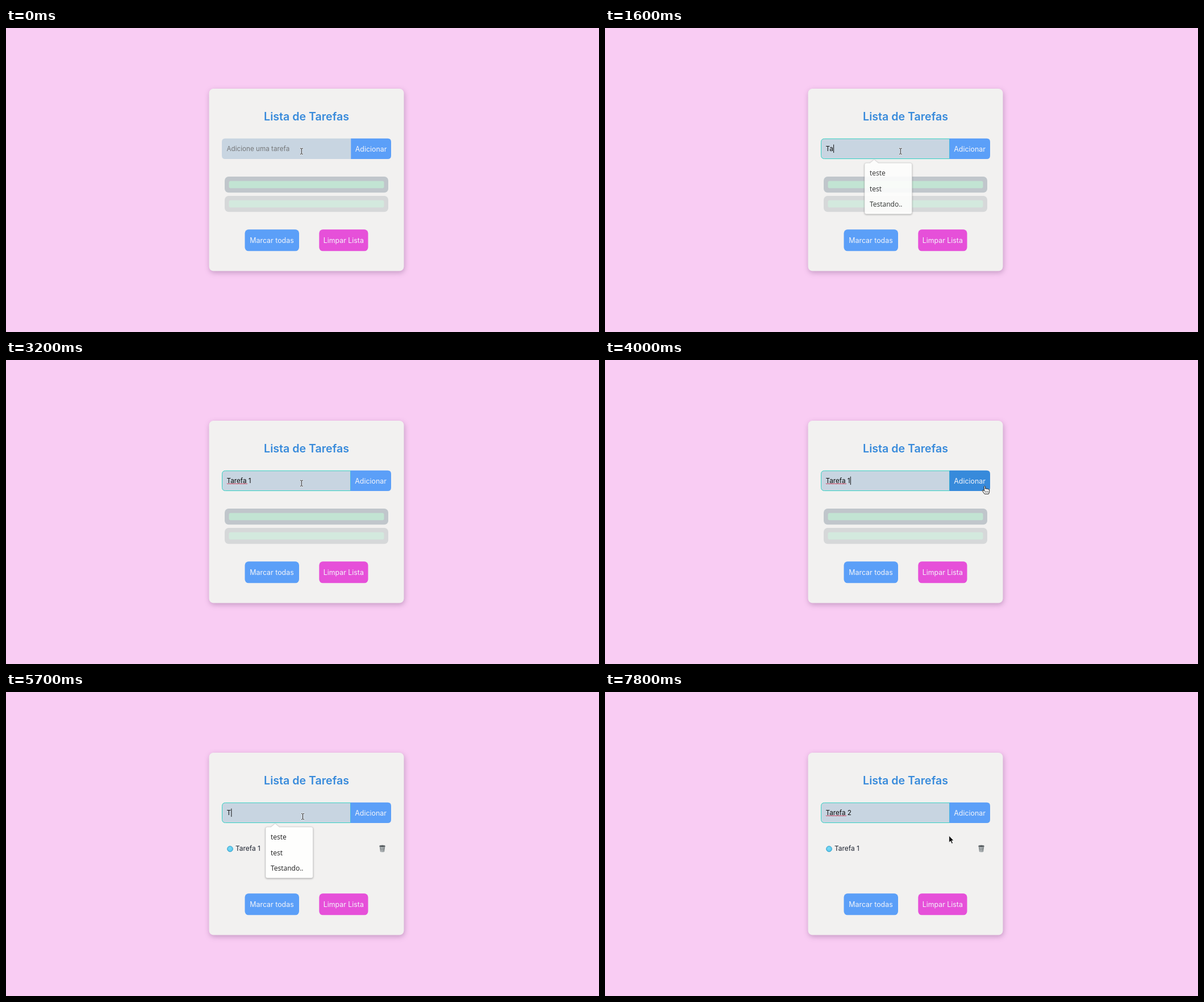
Animation of 1044 by 536 pixels, one loop 8 s. Source, as an HTML page:

```html
<!DOCTYPE html>
<html lang="pt-BR">
<head>
<meta charset="utf-8">
<title>Lista de Tarefas</title>
<style>
  html, body { margin: 0; width: 100%; height: 100%; overflow: hidden; background: #f9ccf3; }
  svg { display: block; width: 1044px; height: 536px; }
  text { font-family: Inter, "Open Sans", sans-serif; white-space: pre; }
  .card { fill: #f2f1f0; filter: drop-shadow(1px 3px 5px rgba(60, 20, 70, .27)); }
  .title { font-size: 19.6px; font-weight: 600; fill: #378adb; text-anchor: middle; }
  .label { font-size: 12.4px; fill: #f4f5fa; text-anchor: middle; }
  .entry { font-size: 11.7px; }
  .item { font-size: 11.9px; fill: #1d2330; }
  .popup text { font-family: "Open Sans", "Noto Sans", sans-serif; font-size: 12px; fill: #1c1c1c; }
  .popup path { fill: #fefefd; stroke: #c9c9c9; stroke-width: .6; filter: drop-shadow(0 1px 1.5px rgba(0, 0, 0, .3)); }
</style>
</head>
<body>
<svg viewBox="0 0 1044 536">
  <defs>
    <radialGradient id="bead" cx=".45" cy=".4" r=".6">
      <stop offset="0" stop-color="#7adcf8"/>
      <stop offset="1" stop-color="#53c4ea"/>
    </radialGradient>
    <linearGradient id="steel">
      <stop offset="0" stop-color="#858b8e"/>
      <stop offset=".45" stop-color="#c9ced0"/>
      <stop offset="1" stop-color="#7d8386"/>
    </linearGradient>
  </defs>

  <rect class="card" x="357.5" y="107" width="343" height="321.5" rx="8"/>
  <text class="title" x="529" y="163">Lista de Tarefas</text>

  <path id="field" fill="#c8d5e1"/>
  <path id="addButton"/>
  <text class="label" id="addLabel" y="217.5">Adicionar</text>
  <text class="entry" id="entry" x="388.5" y="216.8"></text>
  <path id="squiggle" fill="none" stroke="#d0213f" stroke-width=".9"/>
  <rect id="caret" y="205.5" width="1" height="14.5" fill="#111"/>

  <g id="skeleton">
    <rect x="385" y="262" width="288" height="28.2" rx="7" fill="#c0c6cb"/>
    <rect x="392.5" y="269.8" width="273" height="12.8" rx="3" fill="#c2e4d3"/>
    <rect x="385" y="296" width="288" height="28.2" rx="7" fill="#d6d8d9"/>
    <rect x="392.5" y="303.8" width="273" height="12.8" rx="3" fill="#d3e9de"/>
  </g>

  <g id="task">
    <circle cx="394.5" cy="276.7" r="4.9" fill="url(#bead)" stroke="#3d9fc8"/>
    <text class="item" x="404" y="280.3">Tarefa 1</text>
    <path d="M657.6 272h9.8l-1.2 9.4q-3.7 2.4-7.4 0z" fill="url(#steel)"/>
    <path d="M660 274l.8 7M662.5 274v8M665 274l-.8 7M659 277h7" stroke="#747a7d" stroke-width=".6"/>
    <ellipse cx="662.5" cy="271.8" rx="5.2" ry="1.7" fill="#4b5053" stroke="#a4aaad" stroke-width=".8"/>
  </g>

  <rect x="420.5" y="355.3" width="95.5" height="38" rx="6.5" fill="#5b9ff8"/>
  <text class="label" x="468" y="379">Marcar todas</text>
  <rect x="551.3" y="355.3" width="86.2" height="38" rx="6.5" fill="#e650d9"/>
  <text class="label" x="594.3" y="379">Limpar Lista</text>

  <g id="popup" class="popup">
    <path d="M460 238h6.5l7.3-6 7.3 6H537.5q3 0 3 3V325q0 3-3 3H460q-3 0-3-3V241q0-3 3-3z"/>
    <text x="466" y="259.8">teste</text>
    <text x="466" y="287.6">test</text>
    <text x="466" y="315.4">Testando..</text>
  </g>

  <g id="ibeam" fill="none" stroke-linecap="square">
    <path d="M-2-5H-.8L0-4.2.8-5H2M0-4V4M-2 5H-.8L0 4.2.8 5H2" stroke="#fff" stroke-width="2.2" opacity=".75"/>
    <path d="M-2-5H-.8L0-4.2.8-5H2M0-4V4M-2 5H-.8L0 4.2.8 5H2" stroke="#222" stroke-width="1"/>
  </g>
  <path id="arrow" d="M0 0V12.2L2.8 9.7 4.8 14.2 6.9 13.2 5 8.9H8.5z" fill="#111" stroke="#fff" stroke-width=".8"/>
  <g id="hand" stroke-linejoin="round" stroke-linecap="round">
    <path d="M-1.1.8Q0-.6 1.1.8V5Q2.4 3.9 3.4 5.2 4.8 4.3 5.8 5.7 7.5 5 8.2 6.8V9.5Q8 11.8 6.8 14H-.2L-3.8 9.2Q-5 7.4-3.3 7L-1.1 8.8z" fill="#fff" stroke="#1b1b1b"/>
    <path d="M1.1 8.8V11.5M3.4 8.8V11.5M5.6 8.8V11.5" stroke="#1b1b1b" stroke-width=".7"/>
  </g>
</svg>
<script>
const LOOP = 8000;
const PLACEHOLDER = 'Adicione uma tarefa';
const $ = id => document.getElementById(id);
const ui = Object.fromEntries(
  ['field', 'addButton', 'addLabel', 'entry', 'squiggle', 'caret', 'skeleton', 'task',
   'popup', 'ibeam', 'arrow', 'hand'].map(id => [id, $(id)]));

const at = (kind, x, y) => ({ pointer: [kind, x, y] });

// Each step lists only what changes at its time.
const steps = [
  [0, { text: '', focus: false, caret: false, added: false, misspelt: false, popup: 0, hover: 0,
        ...at('ibeam', 520.3, 217.3) }],
  [600, { focus: true, caret: true }],
  [1100, { caret: false }],
  [1300, { text: 'T', caret: true }],
  [1500, { popup: 1 }],
  [1600, { text: 'Ta', popup: .9 }],
  [1700, { popup: .2 }],
  [1900, { text: 'Taref', popup: 0 }],
  [2200, { text: 'Tarefa' }],
  [2400, { text: 'Tarefa ' }],
  [2600, { text: 'Tarefa 1', misspelt: true }],
  [3200, { caret: false }],
  [3400, at('arrow', 468, 138)],
  [3600, { caret: true, ...at('arrow', 510, 160) }],
  [3700, at('arrow', 575, 180)],
  [3800, { hover: .4, ...at('hand', 640, 207) }],
  [3900, { hover: .9, ...at('hand', 662, 219) }],
  [4000, { hover: 1, ...at('hand', 668.5, 222.2) }],
  [4200, { text: '', focus: false, caret: false, misspelt: false, added: true }],
  [4300, at('hand', 650, 219)],
  [4400, { hover: .8, ...at('ibeam', 570, 218) }],
  [4500, { hover: .4, ...at('ibeam', 522.5, 219.5) }],
  [4800, { hover: 0 }],
  [5000, { focus: true, caret: true }],
  [5400, { text: 'T' }],
  [5700, { popup: 1 }],
  [5800, { text: 'Ta', popup: .9 }],
  [5900, { popup: .2 }],
  [6100, { text: 'Taref', popup: 0 }],
  [6200, { text: 'Tarefa' }],
  [6700, { text: 'Tarefa ', misspelt: true }],
  [6900, { text: 'Tarefa 2' }],
  [7300, at('arrow', 508, 175)],
  [7500, { caret: false, ...at('arrow', 503, 302) }],
  [7700, at('arrow', 570, 272)],
  [7800, at('arrow', 605.6, 253.2)],
];

const stateAt = time => Object.assign({}, ...steps.filter(([start]) => start <= time).map(s => s[1]));
const show = (node, visible) => node.setAttribute('visibility', visible ? 'visible' : 'hidden');
const mix = (from, to, k) => `rgb(${from.map((v, i) => Math.round(v + (to[i] - v) * k))})`;

function textWidth(value) {
  ui.entry.textContent = value;
  return value ? ui.entry.getComputedTextLength() : 0;
}

function squigglePath(width) {
  return 'M389 217.6' + 'l1.2 1.3 1.2-1.3'.repeat(Math.round(width / 2.4));
}

function drawField({ focus, hover }) {
  const edge = focus ? 606.5 : 607.2;
  const inset = focus ? .5 : 0;
  const left = 380 + inset, top = 194.8 + inset, bottom = 231 - inset;
  ui.field.setAttribute('d',
    `M${edge} ${top}H${left + 6}Q${left} ${top} ${left} ${top + 6}V${bottom - 6}Q${left} ${bottom} ${left + 6} ${bottom}H${edge}z`);
  ui.field.setAttribute('stroke', focus ? '#35d0c4' : 'none');
  ui.addButton.setAttribute('d', `M${edge} 194.8H672q6 0 6 6V225q0 6-6 6H${edge}z`);
  ui.addButton.setAttribute('fill', mix([91, 159, 248], [55, 138, 219], hover));
  ui.addLabel.setAttribute('x', focus ? 642.1 : 642.6);
}

function drawEntry({ text, caret, misspelt }) {
  if (misspelt) ui.squiggle.setAttribute('d', squigglePath(textWidth('Tarefa')));
  show(ui.squiggle, misspelt);
  ui.caret.setAttribute('x', 388.8 + textWidth(text));
  show(ui.caret, caret);
  ui.entry.textContent = text || PLACEHOLDER;
  ui.entry.setAttribute('fill', text ? '#0c0c0c' : '#757779');
}

function drawPointer([kind, x, y]) {
  for (const name of ['ibeam', 'arrow', 'hand']) show(ui[name], name === kind);
  ui[kind].setAttribute('transform', `translate(${x} ${y})`);
}

function render(time) {
  const state = stateAt(time);
  drawField(state);
  drawEntry(state);
  show(ui.skeleton, !state.added);
  show(ui.task, state.added);
  ui.popup.setAttribute('opacity', state.popup);
  drawPointer(state.pointer);
}

const start = performance.now();
function tick() {
  render((performance.now() - start) % LOOP);
  requestAnimationFrame(tick);
}
tick();
</script>
</body>
</html>
```
